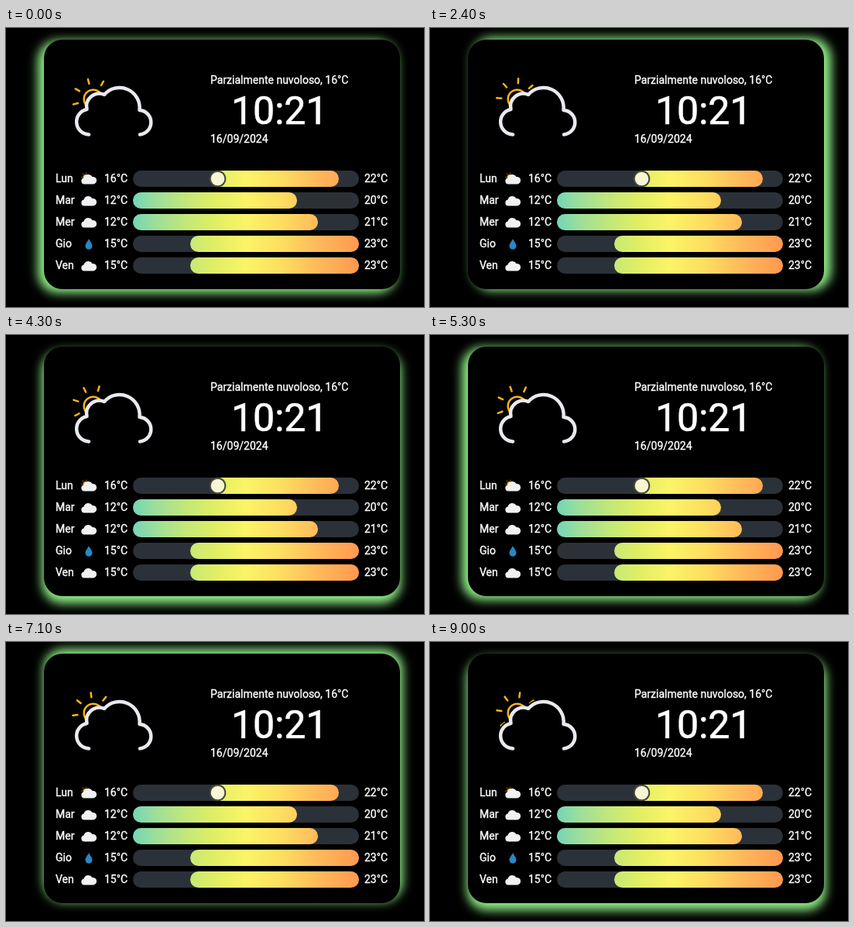
These frames come from a looping animation (540 px wide and 360 px high, 9.1 s). An HTML page:

```html
<!DOCTYPE html>
<html lang="it">
<head>
<meta charset="utf-8">
<style>
html, body { margin: 0; width: 100%; height: 100%; overflow: hidden; background: #000; }
#card { position: absolute; left: 49px; top: 15px; width: 460px; height: 322px; border-radius: 24px; background: #000; }
svg { position: absolute; left: 0; top: 0; }
text { font: 14px Roboto, sans-serif; fill: #fff; stroke: #fff; stroke-width: .35px; }
text.time { font-size: 50px; stroke-width: .7px; }
</style>
</head>
<body>
<div id="card"></div>
<svg width="540" height="360" viewBox="0 0 540 360">
  <defs>
    <linearGradient id="heat" gradientUnits="userSpaceOnUse" x1="164" x2="456">
      <stop offset="0" stop-color="#74d6b6"/>
      <stop offset=".1" stop-color="#9cde9a"/>
      <stop offset=".24" stop-color="#c4e878"/>
      <stop offset=".36" stop-color="#e0ee64"/>
      <stop offset=".5" stop-color="#fbf466"/>
      <stop offset=".66" stop-color="#fddd60"/>
      <stop offset=".82" stop-color="#ffb95a"/>
      <stop offset="1" stop-color="#ff9850"/>
    </linearGradient>
    <g id="cloud">
      <path fill="#f1f1f4" d="M-6 7a4 4 0 0 1-.5-7.900A6 6 0 0 1 4.500-2.500A4.800 4.800 0 0 1 6 7Z"/>
    </g>
    <g id="partly">
      <circle cx="-4" cy="-2" r="3.500" fill="#f5b52a"/>
      <path d="M-9.500-2h1M-8-6.500l1 1M-3.500-7.500v1" stroke="#d99a20"/>
      <use href="#cloud"/>
    </g>
    <path id="rain" fill="#2b86c4" d="M0-6.500C1.500-3 4.500-.5 4.500 2.700A4.500 4.500 0 0 1-4.500 2.700C-4.500-.5-1.500-3 0-6.500Z"/>
    <path id="outline" d="M107 137.500A16.400 16.400 0 0 1 104.500 105A16.500 16.500 0 0 1 127 86A26 26 0 0 1 172.500 106A15.800 15.800 0 0 1 173 137.500"/>
  </defs>
  <g fill="none" stroke="#fbb318" stroke-width="2.500" stroke-linecap="round">
    <g id="rays"></g>
    <!-- keeps the rays clear of the cloud's edge -->
    <use href="#outline" fill="#000" stroke="#000" stroke-width="8"/>
    <circle cx="112.700" cy="91.700" r="12"/>
  </g>
  <use href="#outline" fill="#000" stroke="#e9e9ef" stroke-width="4.500" stroke-linecap="round" stroke-linejoin="round"/>
  <text x="264" y="72">Parzialmente nuvoloso, 16°C</text>
  <text x="291" y="123.500" class="time">10:21</text>
  <text x="264" y="148">16/09/2024</text>
  <g id="days"></g>
</svg>
<script>
const LOOP = 9100, STEP = 100, GLOW_PERIOD = 5333, GLOW_PHASE = 5183;
const byId = id => document.getElementById(id);

// day, icon, low, high, bar start, bar end
const days = [
  ['Lun', 'partly', 16, 22, 264, 430],
  ['Mar', 'cloud', 12, 20, 164, 376],
  ['Mer', 'cloud', 12, 21, 164, 403],
  ['Gio', 'rain', 15, 23, 238, 456],
  ['Ven', 'cloud', 15, 23, 238, 456]
];
const bar = (from, to, fill) =>
  `<rect x="${from}" y="-10.5" width="${to - from}" height="21" rx="10.5" fill="${fill}"/>`;

byId('days').innerHTML = days.map(([day, icon, low, high, from, to], i) => `
  <g transform="translate(0 ${194.5 + 28 * i})">
    <text x="64" y="4.5">${day}</text>
    <use href="#${icon}" x="107" y="0"/>
    <text x="127" y="4.5">${low}°C</text>
    ${bar(164, 456, '#2b3138')}${bar(from, to, 'url(#heat)')}
    <text x="463" y="4.5">${high}°C</text>
  </g>`).join('') +
  '<circle cx="273.5" cy="194.5" r="9.8" fill="#f8f7d4" stroke="#45493c" stroke-width="2"/>';

byId('rays').innerHTML = Array.from({ length: 8 }, (_, i) =>
  `<path d="M20.500 0H26.500" transform="rotate(${45 * i})"/>`).join('');

// The glow visits left, top, right and bottom in turn.
const offsets = [[-6, 3], [-1.5, -6], [8, 0], [0, 8], [-6, 3]];
const glow = byId('card').animate(
  offsets.map(([x, y]) => ({ boxShadow: `${x}px ${y}px 13px 2px #90f088`, easing: 'ease' })),
  { duration: GLOW_PERIOD, iterations: Infinity });
glow.pause();

function draw() {
  const t = Math.floor(performance.now() % LOOP / STEP) * STEP;
  glow.currentTime = t + GLOW_PHASE;
  byId('rays').setAttribute('transform', `translate(112.7 91.7) rotate(${-105 + t * 0.0075})`);
  requestAnimationFrame(draw);
}
draw();
</script>
</body>
</html>
```
